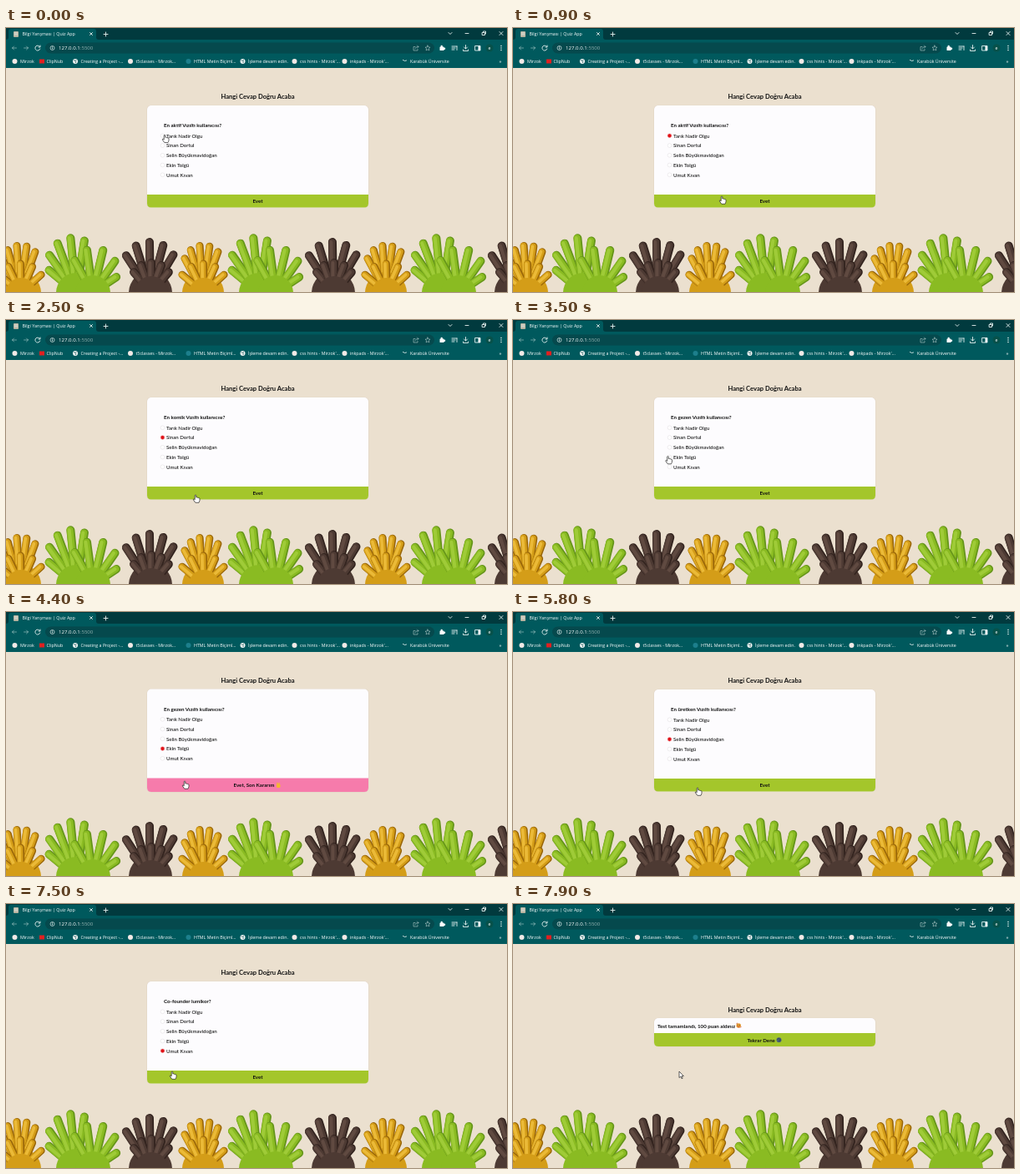
These frames come from a looping animation (600 by 317 pixels, 8 s). An HTML page:

```html
<!DOCTYPE html>
<html lang="tr">
<head>
<meta charset="utf-8">
<title>Bilgi Yarışması</title>
<style>
  html, body { margin: 0; width: 100%; height: 100%; overflow: hidden; background: #ebe0cf; }
  svg { display: block; width: 100%; height: 100%; }
  text { white-space: pre; }
  .ui { font: 500 5.3px "Open Sans", sans-serif; fill: #fff; }
  .url { font-size: 6.1px; }
  .page { font: 500 6.1px Lato, sans-serif; fill: #111; }
  .bold { font-weight: 700; font-size: 6.2px; }
  .title { font-weight: 700; font-size: 7.6px; }
  .mid { text-anchor: middle; }
  .line { fill: none; stroke: #e4efee; stroke-width: .9; stroke-linecap: round; stroke-linejoin: round; }
  .dim { opacity: .5; }
</style>
</head>
<body>
<svg viewBox="0 0 600 317" preserveAspectRatio="none">
  <rect width="600" height="317" fill="#ebe0cf"/>
  <g id="hands"></g>
  <g id="browser"></g>
  <g id="scene"></g>
</svg>
<script>
const LOOP = 8000, STEP = 100;
const byId = id => document.getElementById(id);
const text = (x, y, s, cls) => `<text x="${x}" y="${y}" class="${cls}">${s}</text>`;
const rect = (x, y, w, h, fill, r = 0) =>
  `<rect x="${x}" y="${y}" width="${w}" height="${h}" rx="${r}" fill="${fill}"/>`;
const circle = (x, y, r, fill, extra = '') => `<circle cx="${x}" cy="${y}" r="${r}" fill="${fill}" ${extra}/>`;
const line = (d, cls = '') => `<path class="line ${cls}" d="${d}"/>`;

// A hand is a fan of round fingers around a palm: angles in degrees from upright,
// lengths fall off on both sides of the longest finger at `peak` (0 to 1)
const FLOOR = 318;
const green = ['#65951a', '#8abb22', '#9fcb38'];
const brown = ['#33241f', '#4d3a33', '#604a41'];
const yellow = ['#996609', '#d49d18', '#ebba38'];

function finger(x, angle, length, palm, width, tones) {
  const sin = Math.sin(angle), cos = Math.cos(angle), root = palm * .6;
  return tones.map((tone, i) => {
    const w = width * [1, .8, .4][i], dx = -width * .08 * i;
    return `<path d="M${x + sin * root + dx} ${FLOOR - cos * root}L${x + sin * length + dx} ${FLOOR - cos * length}"
      stroke="${tone}" stroke-width="${w}" stroke-linecap="round"/>`;
  }).join('');
}
function fan(tones, { x, count, from, to, reach, peak, falloff, palm, width = 10 }) {
  let out = '';
  for (let i = 0; i < count; i++) {
    const u = i / (count - 1), angle = (from + (to - from) * u) * Math.PI / 180;
    out += finger(x, angle, reach * (1 - falloff * (u - peak) ** 2), palm, width, tones);
  }
  return out + circle(x, FLOOR, palm, tones[1]);
}
const handRow =
  fan(green, { x: 84, count: 5, from: -50, to: 9, reach: 66, peak: .75, falloff: .64, palm: 24 }) +
  fan(green, { x: 104, count: 5, from: -29, to: 56, reach: 53, peak: .4, falloff: 1, palm: 21 }) +
  fan(brown, { x: 173, count: 5, from: -33, to: 31, reach: 61, peak: .5, falloff: .5, palm: 26 }) +
  fan(brown, { x: 174, count: 5, from: -40, to: 40, reach: 36, peak: .5, falloff: .4, palm: 20 }) +
  fan(yellow, { x: 236, count: 5, from: -28, to: 20, reach: 57, peak: .6, falloff: .5, palm: 25, width: 9 }) +
  fan(yellow, { x: 237, count: 5, from: -50, to: 48, reach: 35, peak: .4, falloff: .2, palm: 18, width: 9 });
const PERIOD_X = 219;
byId('hands').innerHTML = [-1, 0, 1, 2]
  .map(i => `<g transform="translate(${i * PERIOD_X})">${handRow}</g>`).join('');

// Browser window
const dot = fill => x => circle(x, 40, 3, fill);
const globe = x => dot('#f4f7f7')(x) + `<path d="M${x - 2} 39h2l1 2-1 1M${x + 1} 38v1" stroke="#245f5d" fill="none" stroke-width=".8"/>`;
const bookmarks = [
  [17, 'Mirzok', dot('#f1e9e6')],
  [48.5, 'ClipNub', x => rect(x - 2, 37.5, 6, 5, '#e02020')],
  [89.5, 'Creating a Project -...', globe],
  [155.5, 't5classes - Mirzok...', dot('#f1e9e6')],
  [225, 'HTML Metin Biçiml...', dot('#1d7f8c')],
  [290, 'İşleme devam edin.', globe],
  [352, "css hints - Mirzok'...", dot('#f1e9e6')],
  [412, "inkpads - Mirzok'...", dot('#f1e9e6')],
  [484, 'Karabük Üniversite', x => line(`M${x - 2} 38.5l2 1 2-.5`)]
];
const STRIP = '#013a3e', BAR = '#00595d', FIELD = '#05494d';
byId('browser').innerHTML =
  rect(0, 0, 600, 15, STRIP) +
  rect(0, 14, 600, 34, BAR) +
  `<path d="M0 14Q3 14 3 11V4Q3 1 6 1H105Q108 1 108 4V11Q108 14 111 14Z" fill="${BAR}"/>` +
  rect(9, 4, 6, 7, '#b9b3a0', 1) + line('M10.5 6h3M10.5 8h3') +
  text(19.5, 9.4, 'Bilgi Yarışması | Quiz App', 'ui') +
  line('M100.5 5.5l3 3m0-3l-3 3M117 7.5h5M119.5 5v5') +
  line('M530 5.5l2 2 2-2M550 6.5h4M570.5 5.5h3v3h-3zM571.5 5v-1h3v3h-.5M591 4.5l4 4m0-4l-4 4') +
  line('M12.5 24h-5m2-2l-2 2 2 2M21.5 24h5m-2-2l2 2-2 2', 'dim') +
  line('M40.5 22.5a3 3 0 1 0 .3 2.5M41 21v2h-2') +
  rect(47, 17.5, 466, 13, FIELD, 6.5) +
  circle(55.5, 24, 2.5, 'none', 'stroke="#dcebea" stroke-width=".7"') + line('M55.5 23.8v1.2M55.5 22.6v0') +
  text(63, 26.2, '127.0.0.1<tspan fill="#8fb0ae">:5500</tspan>', 'ui url') +
  line('M490 22.5h-2v4.5h5v-1.5M490 25q0-2.5 4-2.5m-1.5-1.5l1.5 1.5-1.5 1.5', 'dim') +
  line('M505 21l.9 2 2.1.2-1.6 1.5.5 2.2-1.9-1.1-1.9 1.1.5-2.2-1.6-1.5 2.1-.2z', 'dim') +
  rect(519.5, 22.5, 5, 4.5, '#fff', .6) + circle(521.7, 22, 1.2, '#fff') + circle(525, 24.7, 1.2, '#fff') +
  line('M534 22h6M534 24h4M534 26h3M540 22v4.5') +
  line('M550.5 20.5v4.5m-2-2l2 2 2-2M547.5 26v1.5h6v-1.5M562 21.5h6v5.5h-6z') +
  rect(565.5, 21.5, 2.5, 5.5, '#fff') +
  circle(579, 24, 4.5, '#07514a') + text(579, 25.8, 'e', 'ui mid') +
  [21.5, 24, 26.5].map(y => circle(593, y, .8, '#e4efee')).join('') +
  bookmarks.map(([x, label, icon]) => icon(x - 6.5) + text(x, 42, label, 'ui')).join('') +
  text(590.5, 42, '»', 'ui url');

// Quiz: every round takes the same time; `rest` is where the pointer stops on the button
const people = ['Tarık Nadir Olgu', 'Sinan Dortul', 'Selin Büyükmavidoğan', 'Ekin Tolgü', 'Umut Kıvan'];
const rounds = [
  { answer: 0, rest: [250, 202], question: 'En aktif Vızıltı kullanıcısı?' },
  { answer: 1, rest: [227, 210], question: 'En komik Vızıltı kullanıcısı?' },
  { answer: 3, rest: [214, 203], question: 'En gezen Vızıltı kullanıcısı?' },
  { answer: 2, rest: [221, 211], question: 'En üretken Vızıltı kullanıcısı?' },
  { answer: 4, rest: [199, 201], question: 'Co-founder lumikor?' }
];
const ROUND = 1625, LEAD = 250;
const ARRIVE = 350, PICK = 700, LEAVE = 750, PRESS = 1100, CONFIRM = 1400;
const END = rounds.length * ROUND - LEAD;
const GREEN = '#a4c62b', PINK = '#f67bab';
const rowY = i => 129.3 + 11.75 * i;

function ease(t, start, end) {
  const u = Math.min(1, Math.max(0, (t - start) / (end - start)));
  return u * u * (3 - 2 * u);
}
const mix = (a, b, u) => a.map((v, i) => v + (b[i] - v) * u);

function pointerAt(index, phase) {
  const { answer, rest } = rounds[index];
  const aim = [190 - 1.5 * answer, rowY(answer) - 1];
  const from = index ? rounds[index - 1].rest : aim;
  return phase < LEAVE ? mix(from, aim, ease(phase, 0, ARRIVE)) : mix(aim, rest, ease(phase, LEAVE, PRESS));
}
function pointer([x, y], clickable) {
  const onRow = x > 185 && x < 255 && people.some((_, i) => Math.abs(rowY(i) - y) < 4);
  const shape = clickable && (y > 199 || onRow)
    ? 'M-.8 .5Q0-.7.8.5V3Q1.8 2.5 2.3 3.3 3.3 2.9 3.7 3.7 4.9 3.4 5 4.6V6.5Q4.7 8 4 9.3H-.2L-2.6 6Q-3 4.8-1.9 4.9L-.8 5.8Z'
    : 'M0 0V7.6L1.8 6 3 8.7 4.2 8.2 3 5.6H5.4Z';
  return `<path transform="translate(${x} ${y})" d="${shape}" fill="#fff" stroke="#222" stroke-width=".7" stroke-linejoin="round"/>`;
}

function card(top, split, bottom, color) {
  return rect(168.5, top - .2, 266, bottom - top + .7, '#e0d4c4', 5) +
    rect(169, top, 265, bottom - top, '#fdfcfe', 5) +
    `<path d="M169 ${split}H434V${bottom - 5}q0 5-5 5H174q-5 0-5-5Z" fill="${color}"/>`;
}
const heading = y => text(301.5, y, 'Hangi Cevap Doğru Acaba', 'page title mid');

function quiz({ question, answer }, phase) {
  const sure = phase >= CONFIRM, grow = sure ? .5 : 0;
  const options = people.map((name, i) => {
    const chosen = i === answer && phase >= PICK;
    return circle(187.5, rowY(i), 2.4, chosen ? '#e01218' : '#fff',
      `stroke="${chosen ? '#f3a5a8' : '#dedade'}" stroke-width=".5"`) +
      text(192, rowY(i) + 2.3, name, 'page');
  }).join('');
  const victory = rect(324, 206.5, 4.5, 4.5, '#f5b92e', 1.6) +
    [324.4, 326.6].map(x => rect(x, 204.8, 1.1, 3, '#f5b92e', .5)).join('');
  return heading(85 - grow) + card(93 - grow, 200 - grow, 215.5 + grow, sure ? PINK : GREEN) +
    `<g transform="translate(0 ${-grow})">${text(189, 119.3, question, 'page bold')}${options}</g>` +
    (sure ? text(272.5, 210.3, 'Evet, Son Kararım', 'page bold') + victory
          : text(301.5, 210, 'Evet', 'page bold mid'));
}
function result() {
  return heading(129.5) + card(137, 155, 171, GREEN) +
    text(173, 148.5, 'Test tamamlandı, 100 puan aldınız', 'page bold') +
    circle(270.2, 146, 2.8, '#eda33b') + [269.2, 271.4].map(x => circle(x, 145.3, .5, '#5b3210')).join('') +
    `<path d="M268.7 147q1.5 1.5 3 0M267.5 143.8l1.5-.8M272.2 148.5l1.2-1.4" stroke="#c2432f" stroke-width=".8" fill="none"/>` +
    text(280.5, 165.5, 'Tekrar Dene', 'page bold') +
    circle(318.5, 163.2, 3, '#4b6478') +
    `<path d="M316.5 162.5q2-2 3.5 0t-2 2" stroke="#2c3d50" stroke-width=".8" fill="none"/>`;
}

let shown = -1;
function tick() {
  const t = Math.floor(performance.now() % LOOP / STEP) * STEP;
  if (t !== shown) {
    shown = t;
    const done = t >= END;
    const index = Math.min(rounds.length - 1, Math.floor((t + LEAD) / ROUND));
    const phase = t + LEAD - index * ROUND;
    byId('scene').innerHTML = (done ? result() : quiz(rounds[index], phase)) + pointer(pointerAt(index, phase), !done);
  }
  requestAnimationFrame(tick);
}
tick();
</script>
</body>
</html>
```
